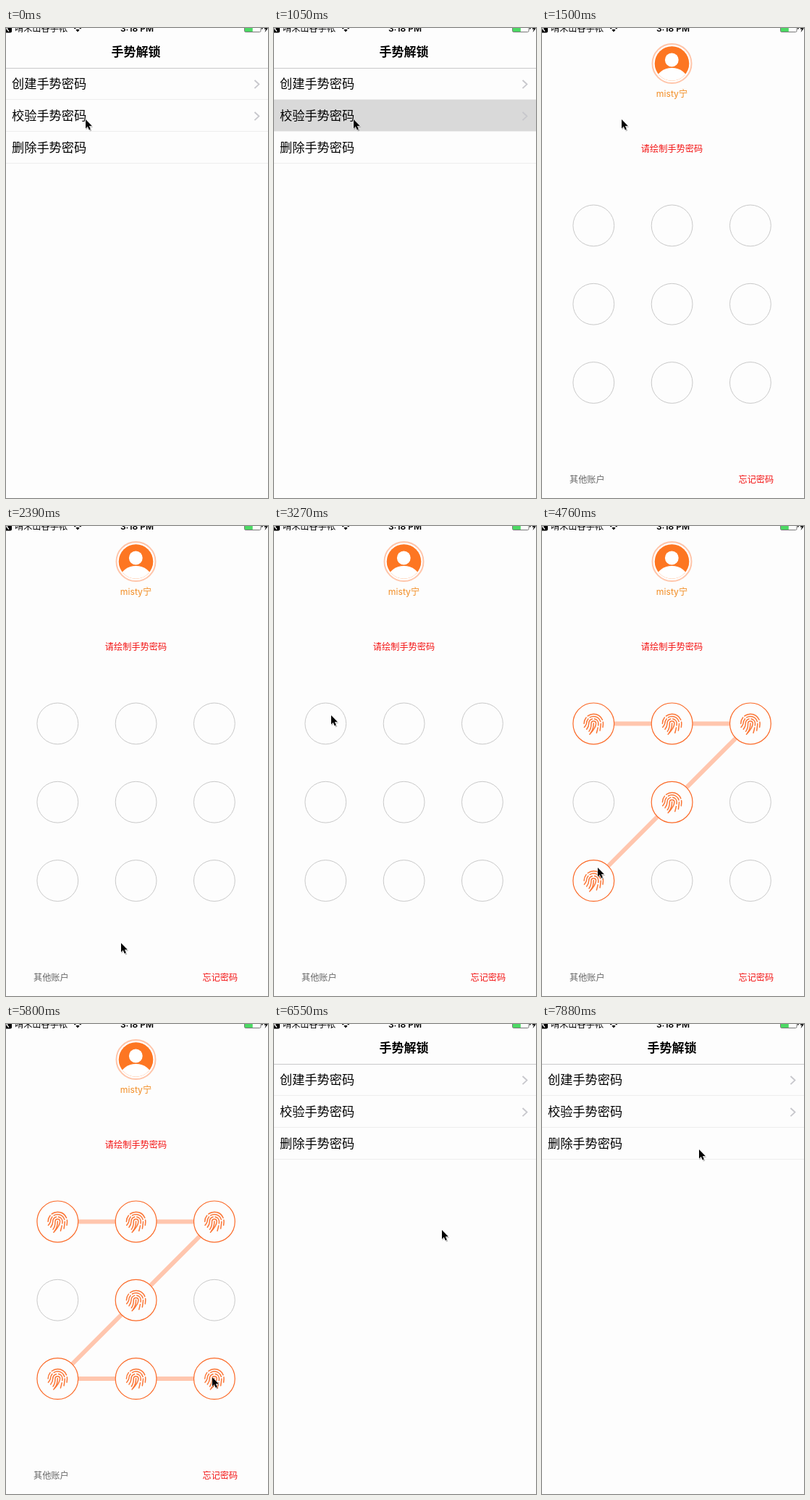
These frames come from a looping animation (362 px wide and 648 px high, 8 s). An HTML page:

```html
<!DOCTYPE html>
<html lang="zh-CN">
<head>
<meta charset="utf-8">
<title>手势解锁</title>
<style>
  html, body { margin: 0; width: 100%; height: 100%; overflow: hidden; background: #fdfdfd; }
  svg { display: block; }
  text { font-family: Inter, "Noto Sans CJK SC", "Noto Sans CJK", sans-serif; }
  .row { font-size: 17.2px; fill: #000; }
  .small { font-size: 12.2px; }
  .dot { fill: #fdfdfd; stroke: #c9c9c9; stroke-width: 1; }
  .on .dot { stroke: #fb6a28; stroke-width: 1.2; }
  .print { display: none; fill: none; stroke: #fb7636; stroke-width: 1.5; stroke-linecap: round; }
  .on .print { display: inline; }
</style>
</head>
<body>
<svg width="362" height="648" viewBox="0 0 362 648">
  <defs>
    <clipPath id="face"><circle cx="179.5" cy="49" r="23.8"/></clipPath>
    <g id="print"></g>
  </defs>

  <rect width="362" height="648" fill="#fdfdfd"/>
  <rect id="press" y="99" width="362" height="43" fill="#d9d9d9"/>
  <text x="179.5" y="39" font-size="17" font-weight="700" text-anchor="middle">手势解锁</text>
  <path d="M0 55.5H362" stroke="#c8c8ca"/>
  <g id="rows"></g>

  <g id="lock">
    <rect width="362" height="648" fill="#fdfdfd"/>
    <circle cx="179.5" cy="49" r="27" fill="#fff" stroke="#ffc5aa" stroke-width="2"/>
    <circle cx="179.5" cy="49" r="23.8" fill="#fd7622"/>
    <g clip-path="url(#face)" fill="#fff">
      <circle cx="179.3" cy="44" r="9.4"/>
      <ellipse cx="179.5" cy="72" rx="21.5" ry="17"/>
    </g>
    <text class="small" x="179.5" y="95.4" text-anchor="middle" fill="#f28c22">misty宁</text>
    <text class="small" x="179.5" y="170.6" text-anchor="middle" fill="#f31414">请绘制手势密码</text>
    <polyline id="trail" fill="none" stroke="#ffc6ae" stroke-width="6" stroke-linejoin="round"/>
    <g id="dots"></g>
    <text class="small" x="38" y="627.4" fill="#686868">其他账户</text>
    <text class="small" x="271.5" y="627.4" fill="#f31414">忘记密码</text>
  </g>

  <g id="status">
    <rect x="-4" y="-8" width="12" height="14.5" rx="2"/>
    <path d="M4 -3L1 1L4 4.6" fill="none" stroke="#fff" stroke-width="1.4"/>
    <text class="small" x="12" y="5">晴禾山谷手帐</text>
    <path d="M99 5.6L96.4 2.6Q99 .7 101.6 2.6Z"/>
    <path d="M94.4 .8Q99 -2.6 103.6 .8" fill="none" stroke="#000" stroke-width="1.5"/>
    <text x="181" y="5.4" font-size="12" font-weight="600" text-anchor="middle">3:18 PM</text>
    <rect x="329.5" y="-4.5" width="22.5" height="10" rx="1.6" fill="#fdfdfd" stroke="#777"/>
    <rect x="330" y="-4" width="10.8" height="9" fill="#4cd964"/>
    <path d="M353.2 -2v4q1.6 -.6 1.6 -2t-1.6 -2z"/>
    <path d="M360.5 -4L356.5 1.4H359L357.6 6L362 .2H359.6Z"/>
  </g>

  <g id="cursor">
    <path d="M1.6 2.6V15.4L4.6 12.6L7 17.4L9.4 16.4L7.2 12H11.4Z" opacity=".25"/>
    <path d="M1 1V13.4L3.8 10.8L5.8 15.4L7.8 14.5L5.9 10H9.8Z" stroke="#fff" paint-order="stroke"/>
  </g>
</svg>
<script>
const LOOP = 8000, TICK = 148.5;
const DRAW_FROM = 3415, DRAW_TO = 5792;
const RADIUS = 28.4;
const $ = id => document.getElementById(id);

// Pointer way points: time, x, y
const path = [
  [0, 109, 125], [1500, 109, 125], [2080, 243, 560], [2580, 100, 583],
  [3110, 90, 232], [3265, 78, 260], [DRAW_FROM, 78, 260], [4160, 317, 264],
  [4750, 75, 470], [5500, 284, 486], [6240, 284, 486], [6534, 231, 283],
  [6980, 217, 143], [7270, 216, 172], [LOOP, 216, 172]
];

const center = i => [71.3 + 108.3 * (i % 3), 272.4 + 108.3 * Math.floor(i / 3)];

// Fingerprint: nested arches whose legs sweep to the lower left
$("print").innerHTML = "<path d='M0 -.5C0 5 -1 9 -4 12.8'/>" + [1, 2, 3, 4].map(n => {
  const r = 3.3 * n, low = 13.5 - 2.8 * n;
  const left = n < 4 ? `M${-r - 3} ${low}Q${-r} ${low - 4} ${-r} 0` : `M${-r} 0`;
  const gaps = n > 1 ? `${25 - 4 * n} 3 ${6 * n} 3` : "none";
  return `<path stroke-dasharray="${gaps}" d="${left}A${r} ${r} 0 0 1 ${r} 0` +
    `Q${r} ${low / 2} ${r - 8 / n / n + n / 4 - 1} ${15.5 - n * n * .65}"/>`;
}).join("");

$("rows").innerHTML = ["创建", "校验", "删除"].map((verb, i) =>
  `<g transform="translate(0 ${44 * i})"><path d="M0 98.5H362" stroke="#eee"/>` +
  `<text class="row" x="8" y="83">${verb}手势密码</text>` +
  (i < 2 ? `<path d="M343.5 72l6 5.6l-6 5.6" fill="none" stroke="#c7c7cc" stroke-width="1.8"/>` : "") +
  "</g>").join("");

$("dots").innerHTML = Array.from({ length: 9 }, (_, i) =>
  `<g transform="translate(${center(i)})"><circle class="dot" r="${RADIUS}"/>` +
  `<use class="print" href="#print"/></g>`).join("");
const dots = [...$("dots").children];

function pointer(t) {
  const n = path.findIndex(p => p[0] > t);
  const [t0, x0, y0] = path[n - 1], [t1, x1, y1] = path[n];
  const k = (t - t0) / (t1 - t0);
  return [x0 + (x1 - x0) * k, y0 + (y1 - y0) * k];
}

// Dots the pointer has crossed since the gesture began, in order
function joinedAt(t) {
  const hit = new Set();
  for (let s = DRAW_FROM; s <= Math.min(t, DRAW_TO); s += 10) {
    const [x, y] = pointer(s);
    dots.forEach((_, i) => {
      const [cx, cy] = center(i);
      if (Math.hypot(x - cx, y - cy) < RADIUS) hit.add(i);
    });
  }
  return [...hit];
}

function easeOut(t, from, length) {
  const k = Math.min(1, Math.max(0, (t - from) / length));
  return 1 - (1 - k) ** 2;
}

function draw(now) {
  // The screen refreshes once per tick.
  const t = Math.floor(now % LOOP / TICK) * TICK;
  const tip = pointer(t);
  const joined = joinedAt(t);
  const y = 648 * (1 - easeOut(t, 1040, 440) + easeOut(t, DRAW_TO, 290));

  $("press").style.display = t > 1030 && t < DRAW_FROM ? "" : "none";
  $("lock").setAttribute("transform", `translate(0 ${y})`);
  $("cursor").setAttribute("transform", `translate(${tip.map(Math.round)})`);
  dots.forEach((d, i) => d.classList.toggle("on", joined.includes(i)));
  const points = joined.map(center);
  if (points.length) points.push(tip);
  $("trail").setAttribute("points", points.join(" "));
}

const start = performance.now();
function frame() {
  draw(performance.now() - start);
  requestAnimationFrame(frame);
}
frame();
</script>
</body>
</html>
```
